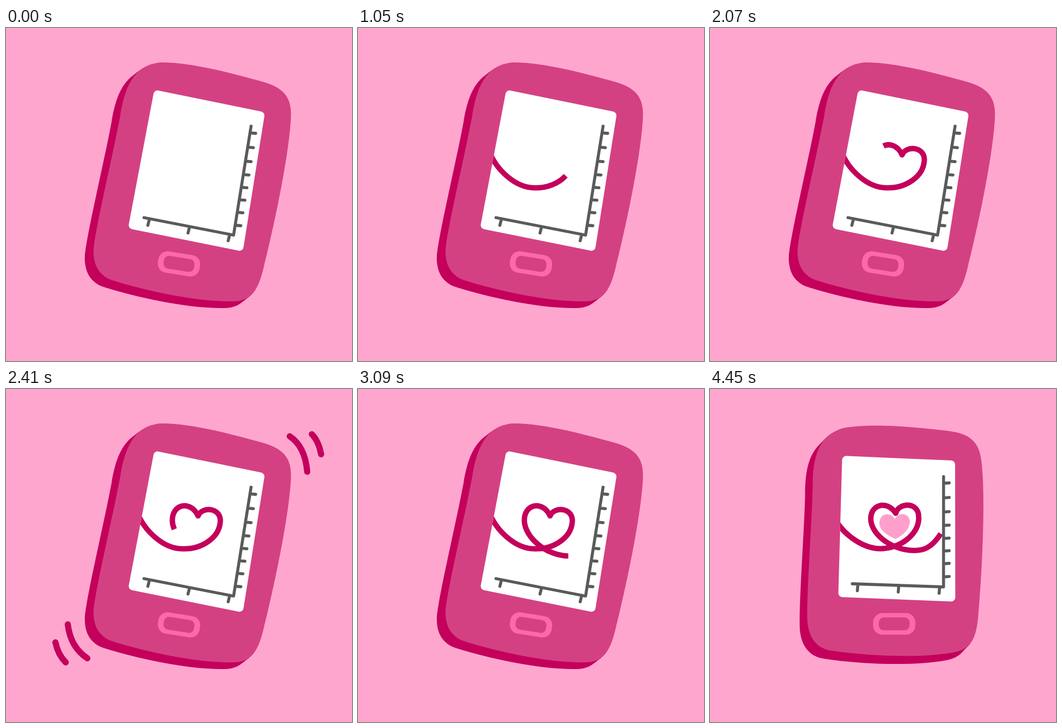
Recreate the animation shown at these times as an HTML page with a canvas. Size 672x648 px, loop 4.62 s.

```html
<!DOCTYPE html>
<html lang="en">
<head>
<meta charset="utf-8">
<title>Heart monitor</title>
<style>
  html, body { margin: 0; width: 100%; height: 100%; overflow: hidden; background: #ffa6cf; }
  canvas { display: block; }
</style>
</head>
<body>
<canvas id="stage" width="672" height="648"></canvas>
<script>
const ctx = document.getElementById('stage').getContext('2d');
const LOOP = 4620, STEP = 170, LINE_DONE = 20;
const TILT = 9.1 * Math.PI / 180;
const PINK = '#ffa6cf', FACE = '#d44182', DARK = '#c4005c', GREY = '#595b5b', BUTTON = '#fe68aa';

const face = new Path2D(`M222 170 C231 115 248 72 300 67 C360 66 450 91 500 105
  C540 117 557 135 553 180 C549 250 521 385 500 468 C490 508 478 532 440 532
  C370 533 270 511 210 492 C182 484 170 463 170 435 C171 400 205 260 222 170Z`);
const pulse = new Path2D(`M255 240 C268 275 305 311 343 311 C380 312 413 290 416 260
  C420 231 381 227 373 247 C360 217 323 222 323 256
  C324 290 368 326 411 325 C430 324 447 308 458 294`);
const heart = new Path2D(`M359 253 C352 239 329 240 329 261 C329 276 346 285 360 292
  C375 285 388 273 388 258 C388 240 366 239 359 253Z`);
const marks = [
  new Path2D('M551 92 Q581 112 585 161 M120 458 Q125 502 158 524'),
  new Path2D('M594 88 Q607 101 612 127 M96 493 Q101 517 116 532')];
const screen = roundedQuad([[288, 120], [503, 164], [460, 435], [237, 390]], 8);
const scales = axisPath([476, 191], [442, 403], [268, 369]);

function roundedQuad(corners, radius) {
  const path = new Path2D();
  const [a, b] = corners;
  path.moveTo((a[0] + b[0]) / 2, (a[1] + b[1]) / 2);
  for (let i = 1; i <= 4; i++) {
    path.arcTo(...corners[i % 4], ...corners[(i + 1) % 4], radius);
  }
  path.closePath();
  return path;
}

// Two axes meeting in `corner`, with hand-spaced ticks on their outer sides.
function axisPath(top, corner, left) {
  const path = new Path2D();
  path.moveTo(...top);
  path.lineTo(...corner);
  path.lineTo(...left);
  const slope = (corner[0] - top[0]) / (corner[1] - top[1]);
  for (let i = 0; i < 8; i++) {
    const y = top[1] + 13 + 26.1 * i + 3 * Math.sin(0.65 * i);
    const x = top[0] + slope * (y - top[1]);
    path.moveTo(x, y);
    path.lineTo(x + 11, y + 1);
  }
  for (let i = 0; i < 3; i++) {
    const x = left[0] + 10 + 78 * i, y = left[1] + 5 + 15 * i;
    path.moveTo(x, y);
    path.lineTo(x - 2.5, y + 10);
  }
  return path;
}

function fill(path, color) {
  ctx.fillStyle = color;
  ctx.fill(path);
}

function stroke(path, color, width, cap = 'round') {
  ctx.strokeStyle = color;
  ctx.lineWidth = width;
  ctx.lineCap = cap;
  ctx.lineJoin = 'round';
  ctx.stroke(path);
}

function pill(w, h, r, color) {
  const path = new Path2D();
  path.roundRect(-w / 2, -h / 2, w, h, r);
  fill(path, color);
}

// Drawn length: quick up to the heart, then slower and gently speeding up.
function pulseReach(frame) {
  if (frame < 6) return 31 * frame;
  const n = Math.min(frame, LINE_DONE) - 6;
  return 186 + 22.4 * n + 0.15 * n * n;
}

function drawBody() {
  const depth = 17;
  for (let i = depth; i > 0; i--) {
    ctx.save();
    ctx.translate(-i, i * 13 / depth);
    fill(face, DARK);
    ctx.restore();
  }
  fill(face, FACE);

  ctx.save();
  ctx.translate(336, 459);
  ctx.rotate(TILT);
  pill(82, 42, 18, BUTTON);
  pill(60, 25, 10, FACE);
  ctx.restore();
}

function drawScreen(frame) {
  fill(screen, '#fff');
  if (frame > 0) {
    ctx.save();
    ctx.clip(screen);
    ctx.setLineDash([pulseReach(frame), 2000]);
    stroke(pulse, DARK, 10.5, 'butt');
    ctx.restore();
  }
  stroke(scales, GREY, 5.8);
}

function frameAt(t) {
  return t < 1050 ? Math.min(5, Math.floor(t / STEP)) : 6 + Math.floor((t - 1050) / STEP);
}

function render(now) {
  const frame = frameAt(now % LOOP);
  const upright = frame > LINE_DONE;
  ctx.fillStyle = PINK;
  ctx.fillRect(0, 0, 672, 648);

  ctx.save();
  if (upright) {
    ctx.translate(364.25, 271.5);
    ctx.rotate(-TILT);
    ctx.translate(-371.75, -276.75);
  }
  drawBody();
  drawScreen(frame);
  ctx.restore();

  if (upright) fill(heart, '#ffa0cc');
  else marks.slice(0, frame % 3).forEach(mark => stroke(mark, DARK, 12));
}

const start = performance.now();
function tick() {
  render(performance.now() - start);
  requestAnimationFrame(tick);
}
tick();
</script>
</body>
</html>
```
